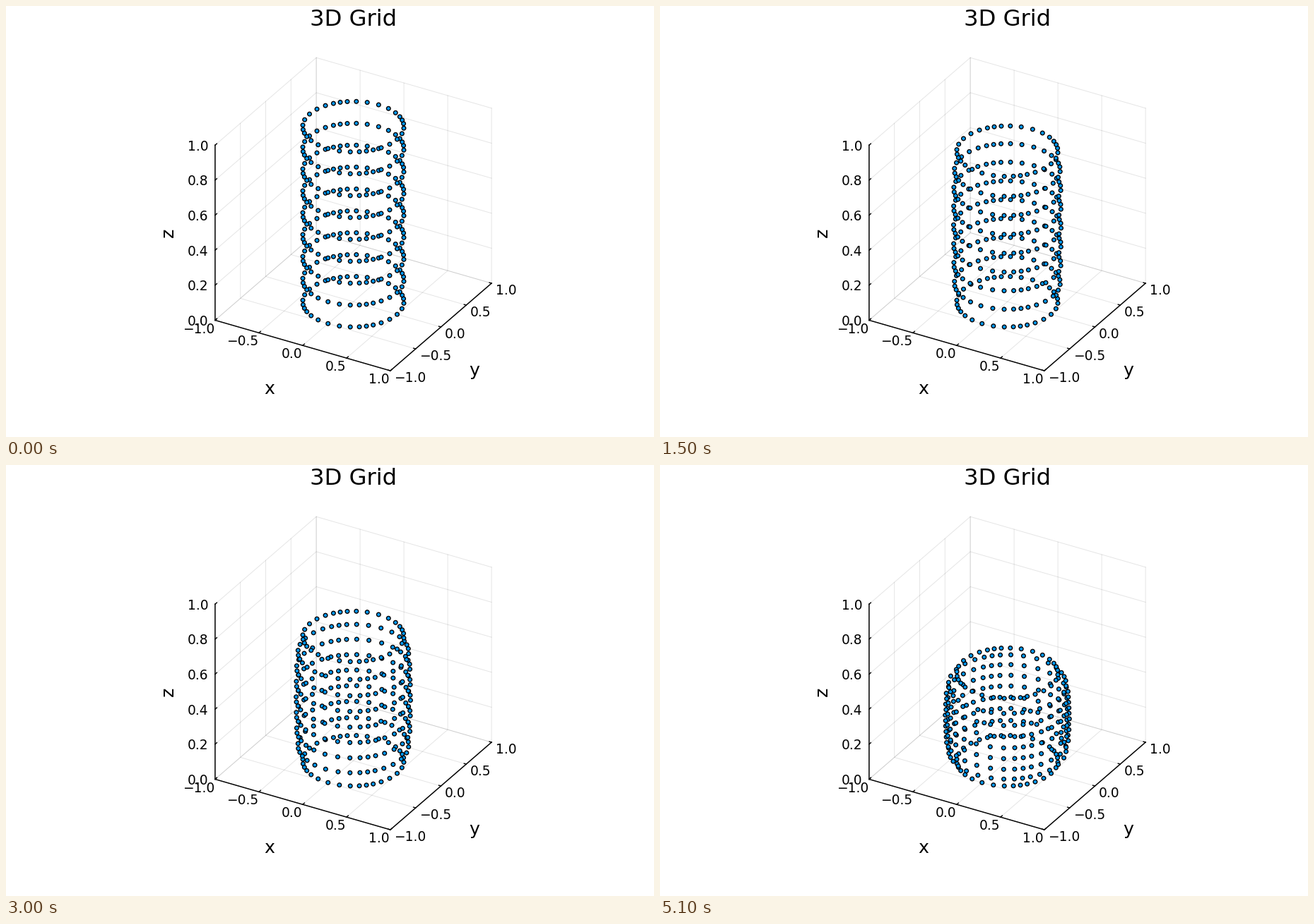
Recreate the animation shown at these times as a matplotlib script. Size 917 by 611 pixels, loop 5200 ms.

```python
import numpy as np
import matplotlib.pyplot as plt
from matplotlib.animation import FuncAnimation

W, H, DPI = 917, 611, 100
FRAMES, INTERVAL = 52, 100
PT = 72 / DPI  # points per pixel
TICK, GUIDE, TITLE = 18.6 * PT, 25.3 * PT, 32.3 * PT

plt.rcParams["font.family"] = "DejaVu Sans"
fig = plt.figure(figsize=(W / DPI, H / DPI), dpi=DPI, facecolor="white")
ax = fig.add_axes([0, 0, 1, 1])
ax.set_xlim(0, W)
ax.set_ylim(H, 0)
ax.axis("off")


def project(x, y, z):
    """Orthographic view, 30 degrees azimuth and elevation, in pixels."""
    return (491.5 + 124 * x + 71.6 * y,
            419.25 + 35.8 * x - 62 * y - 248.2 * z)


def polyline(*points, **style):
    px, py = zip(*(project(*p) for p in points))
    ax.plot(px, py, color="black", snap=False, **style)


def label(x, y, text, size=TICK, ha="center", **kw):
    ax.text(x, y, text, fontsize=size, ha=ha, va="baseline", color="black", **kw)


def number(v):
    return f"{v:.1f}".replace("-", "\u2212")


def tick(point, dx, dy):
    px, py = project(*point)
    ax.plot([px, px + dx], [py, py + dy], color="black", lw=1.4 * PT, snap=False)
    return px, py


h_ticks = np.linspace(-1, 1, 5)
z_ticks = np.linspace(0, 1, 6)

# Grid on the floor and the two back walls
grid = dict(lw=1.0 * PT, alpha=0.1)
for v in h_ticks:
    polyline((v, -1, 0), (v, 1, 0), (v, 1, 1), **grid)
    polyline((1, v, 0), (-1, v, 0), (-1, v, 1), **grid)
for v in z_ticks:
    polyline((-1, -1, v), (-1, 1, v), (1, 1, v), **grid)

# Axes
polyline((-1, -1, 1), (-1, -1, 0), lw=1.5 * PT)
polyline((-1, -1, 0), (1, -1, 0), (1, 1, 0), lw=1.5 * PT)

# Ticks and numbers
for v in h_ticks:
    px, py = tick((v, -1, 0), 2.4, -2.1)
    label(px - 0.8, py + 18.1, number(v), ha="right")
    px, py = tick((1, v, 0), -3, -0.9)
    label(px + 5.5, py + 16, number(v), ha="left")
for v in z_ticks:
    px, py = tick((-1, -1, v), 2.4, -2.1)
    label(px - 9.3, py + 7.5, number(v), ha="right")

label(491.5, 28.2, "3D Grid", TITLE)
label(372.8, 550.3, "x", GUIDE)
label(662.5, 523.8, "y", GUIDE)
label(236.5, 321.3, "z", GUIDE, rotation=90, rotation_mode="anchor")

# Rim of a 9 x 9 square grid, pushed out radially onto a circle
side = np.arctan(np.arange(-4, 4) / 4)
theta = np.concatenate([side + q * np.pi / 2 for q in range(4)])
level = np.linspace(0, 1, 9)
half = [0, 0.163, 0.208, 0.220, 0.228]
bulge = np.array(half + half[-2::-1])


def cylinder(strain):
    """Pixel positions of the compressed, bulging surface."""
    radius = (0.5 + strain * bulge)[:, None]
    height = ((1 - strain) * level)[:, None]
    px, py = project(radius * np.cos(theta), radius * np.sin(theta), height)
    return np.column_stack([px.ravel(), py.ravel()])


start = cylinder(0)
dots = ax.scatter(*start.T, s=np.full(len(start), (5.6 * PT) ** 2),
                  facecolor="#009AFA", edgecolor="black",
                  linewidth=1.4 * PT, zorder=5, snap=False)


def update(i):
    dots.set_offsets(cylinder(0.01 * max(0, i - 1)))
    return (dots,)


anim = FuncAnimation(fig, update, frames=FRAMES, interval=INTERVAL,
                     repeat=True, repeat_delay=0)
plt.show()
```
